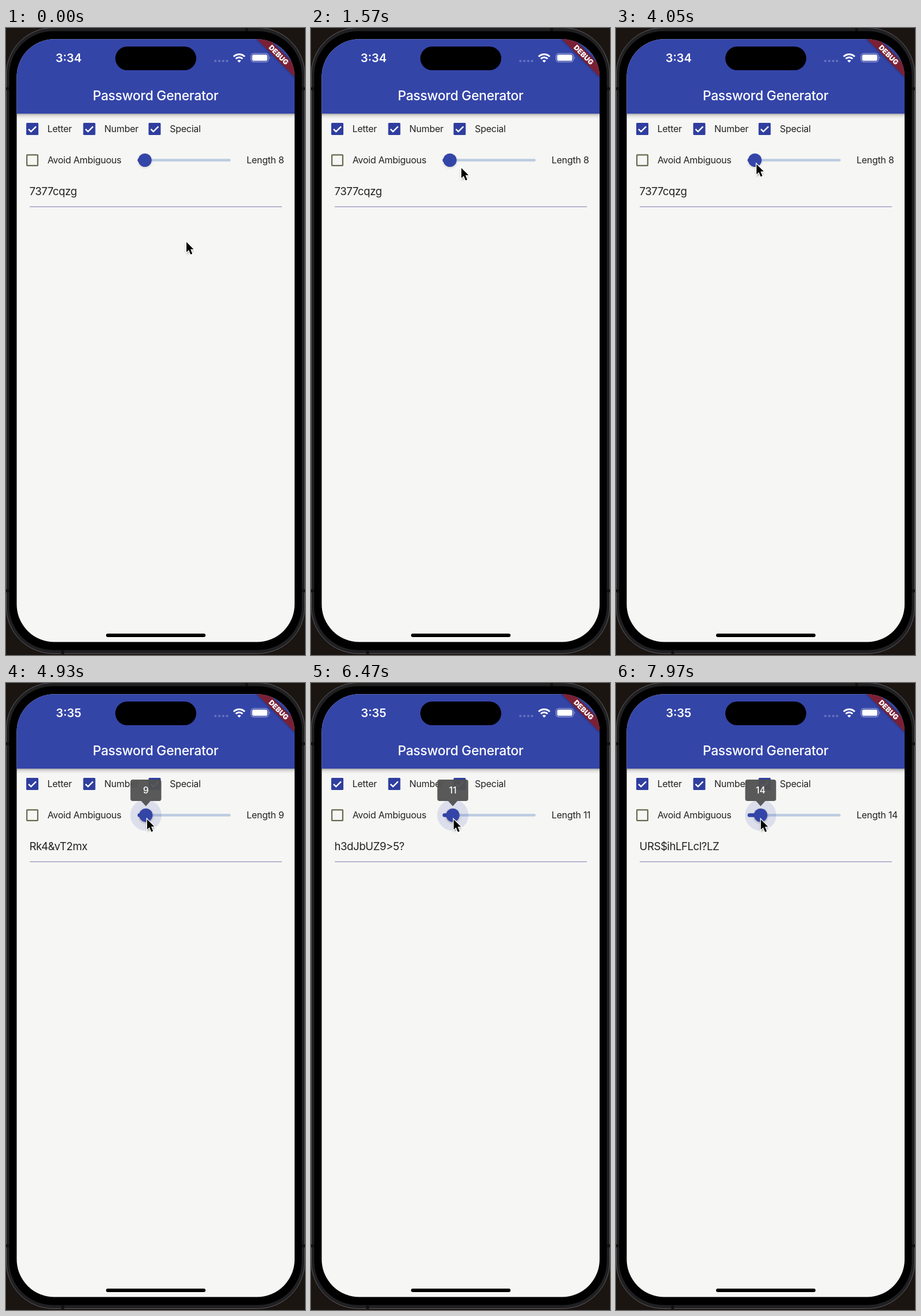
An HTML page that plays this animation: 517x1084 px, repeating every 7.99 s.

```html
<!DOCTYPE html>
<html lang="en">
<head>
<meta charset="utf-8">
<title>Password Generator</title>
<style>
html, body { margin: 0; width: 100%; height: 100%; overflow: hidden; background: #1b1512; }
svg { display: block; width: 517px; height: 1084px; }
text { font-family: Inter, "Open Sans", sans-serif; fill: #222; white-space: pre; }
.label { font-size: 16px; letter-spacing: -.28px; }
.title { font-size: 22.8px; font-weight: 500; letter-spacing: -.27px; fill: #fff; }
.clock { font-size: 20px; font-weight: 600; fill: #fff; }
.field { font-size: 18.6px; letter-spacing: -.45px; }
.tip { font-size: 15.5px; font-weight: 500; fill: #fff; }
.debug { font-size: 12.2px; font-weight: 900; fill: #fff; }
.mid { text-anchor: middle; }
</style>
</head>
<body>
<svg viewBox="0 0 517 1084">
  <defs>
    <clipPath id="screen"><rect x="18.5" y="19.3" width="480.5" height="1042.2" rx="65"/></clipPath>
    <filter id="soft" x="-50%" y="-50%" width="200%" height="200%"><feGaussianBlur stdDeviation="2"/></filter>
    <linearGradient id="shade" x2="0" y2="1">
      <stop stop-color="#000" stop-opacity=".32"/>
      <stop offset=".4" stop-color="#000" stop-opacity=".1"/>
      <stop offset="1" stop-color="#000" stop-opacity="0"/>
    </linearGradient>
    <g id="checked">
      <rect x="-10.5" y="-10.5" width="21" height="21" rx="1.5" fill="#2f3e9f"/>
      <path d="M-6.5 .3 L-2.2 4.6 L6.5 -4.2" fill="none" stroke="#fff" stroke-width="2.4"/>
    </g>
  </defs>

  <!-- Phone body -->
  <rect x=".5" y="-.5" width="516" height="1082" rx="81" fill="#202022" stroke="#5c5c61"/>
  <path d="M0 105H6M511 105H517M0 973H6M511 973H517M416 0V6M98 1076V1082" stroke="#111" stroke-width="5"/>
  <rect x="5.5" y="5.5" width="506" height="1070" rx="76"/>

  <g clip-path="url(#screen)">
    <rect x="18" y="19" width="482" height="1043" fill="#f6f6f4"/>
    <rect x="18" y="148" width="482" height="9" fill="url(#shade)"/>
    <rect x="18" y="19" width="482" height="129" fill="#3445a8"/>

    <text id="clock" class="clock mid" x="108.3" y="59"></text>
    <rect x="189" y="32" width="140" height="41" rx="20.5"/>
    <g fill="#6373c2">
      <circle cx="362" cy="57" r="2.1"/><circle cx="368.8" cy="57" r="2.1"/>
      <circle cx="375.6" cy="57" r="2.1"/><circle cx="382.2" cy="57" r="2.1"/>
    </g>
    <g fill="none" stroke="#fff" stroke-width="3">
      <path d="M393.6 49.5A13.6 13.6 0 0 1 412.8 49.5M397.3 53.2A8.4 8.4 0 0 1 409.1 53.2"/>
      <path d="M403.2 59.8L400 56.5A4.6 4.6 0 0 1 406.4 56.5Z" fill="#fff" stroke="none"/>
    </g>
    <rect x="423.6" y="44.1" width="30.2" height="14.6" rx="4.6" fill="none" stroke="#9aa2d3" stroke-width="1.2"/>
    <rect x="425.6" y="46.1" width="26.2" height="10.6" rx="2.8" fill="#fff"/>
    <path d="M455.4 49V54Q457.4 51.5 455.4 49Z" fill="#9aa2d3"/>
    <text class="title mid" x="258.6" y="124.5">Password Generator</text>

    <use href="#checked" x="45.5" y="174.5"/>
    <use href="#checked" x="144" y="174.5"/>
    <use href="#checked" x="257" y="174.5"/>
    <rect x="36.1" y="219.3" width="18.8" height="18.6" rx=".8" fill="none" stroke="#69684f" stroke-width="2.2"/>
    <g class="label">
      <text x="71.5" y="180">Letter</text>
      <text x="170" y="180">Number</text>
      <text x="283.3" y="180">Special</text>
      <text x="71.7" y="234">Avoid Ambiguous</text>
      <text id="length" x="416" y="234"></text>
    </g>

    <rect x="228" y="226.3" width="160.5" height="4.4" rx="2.2" fill="#bccbe1"/>
    <rect id="active" x="227.5" y="225.2" height="6.6" rx="3.3" fill="#3445a8"/>
    <g id="thumb">
      <circle id="halo" fill="#3445a8" fill-opacity=".13"/>
      <circle id="thumbShade" cy="1.5" r="11" filter="url(#soft)"/>
      <circle r="11.6" fill="#3445a8"/>
      <g id="bubble">
        <path d="M-22.7 -61.5H22.7Q26.7 -61.5 26.7 -57.5V-28.5Q26.7 -24.5 22.7 -24.5H8L0 -15.5L-8 -24.5H-22.7Q-26.7 -24.5 -26.7 -28.5V-57.5Q-26.7 -61.5 -22.7 -61.5Z" fill="#525252" fill-opacity=".95"/>
        <text id="value" class="tip mid" y="-37.5"></text>
      </g>
    </g>

    <text id="password" class="field" x="40.5" y="289"></text>
    <path d="M41 309H477" stroke="#a3a0c5" stroke-width="1.4"/>
    <rect x="173" y="1047" width="172" height="6" rx="3"/>

    <g transform="translate(499 19) rotate(45)">
      <rect x="-60" y="31.6" width="120" height="14.7" opacity=".4" filter="url(#soft)"/>
      <rect x="-60" y="31.6" width="120" height="14.7" fill="#7b2034"/>
      <text class="debug mid" y="43.3">DEBUG</text>
    </g>
  </g>

  <g id="cursor">
    <path d="M0 2V20L12 16Z" opacity=".4" filter="url(#soft)"/>
    <path d="M0 0V17.5L4 13.8L7.2 21.5L10.2 20.2L7 12.6H12.5Z" stroke="#fff" stroke-width="2.6" paint-order="stroke"/>
  </g>
</svg>
<script>
const LOOP = 7990, PRESS = 4500, CLOCK_TICK = 4900;

// [time, x, y] of the pointer tip
const path = [
  [0, 312, 370], [1570, 260, 242], [2690, 192, 216], [4050, 243, 235.5],
  [5770, 245, 236], [7290, 249, 236], [7970, 250.5, 236]
];

// [time, length, password]
const states = [
  [0, 8, "7377cqzg"], [4800, 9, "Rk4&vT2mx"], [5130, 10, "b8?LwQe5Z$"],
  [5470, 11, "h3dJbUZ9>5?"], [6550, 12, "1=FgyTUrB%i*"],
  [7480, 13, "pX6!dNs9aK=fW"], [7800, 14, "URS$ihLFLcl?LZ"]
];

const el = id => document.getElementById(id);
const clamp = v => Math.max(0, Math.min(1, v));
const smooth = v => v * v * (3 - 2 * v);
const thumbX = n => 240.2 + (n - 8) * 1.65;

function pointer(t) {
  if (t >= path.at(-1)[0]) return path.at(-1).slice(1);
  const i = path.findIndex(p => p[0] > t);
  const [t0, x0, y0] = path[i - 1], [t1, x1, y1] = path[i];
  const k = smooth((t - t0) / (t1 - t0));
  return [x0 + (x1 - x0) * k, y0 + (y1 - y0) * k];
}

function draw(t) {
  const i = states.findLastIndex(s => s[0] <= t);
  const [since, length, password] = states[i];
  const before = states[Math.max(0, i - 1)][1];
  const x = thumbX(before + (length - before) * smooth(clamp((t - since) / 75)));
  const press = smooth(clamp((t - PRESS) / 120));

  el("clock").textContent = t < CLOCK_TICK ? "3:34" : "3:35";
  el("length").textContent = "Length " + length;
  el("value").textContent = length;
  el("password").textContent = password;
  el("active").setAttribute("width", x - 227.5);
  el("thumb").setAttribute("transform", `translate(${x} 228.5)`);
  el("halo").setAttribute("r", 27 * press);
  el("thumbShade").setAttribute("opacity", .2 + .2 * press);
  el("bubble").setAttribute("transform", `scale(${press})`);
  el("cursor").setAttribute("transform", `translate(${pointer(t)})`);
}

const start = performance.now();
function tick() {
  draw(Math.max(0, performance.now() - start) % LOOP);
  requestAnimationFrame(tick);
}
tick();
</script>
</body>
</html>
```
